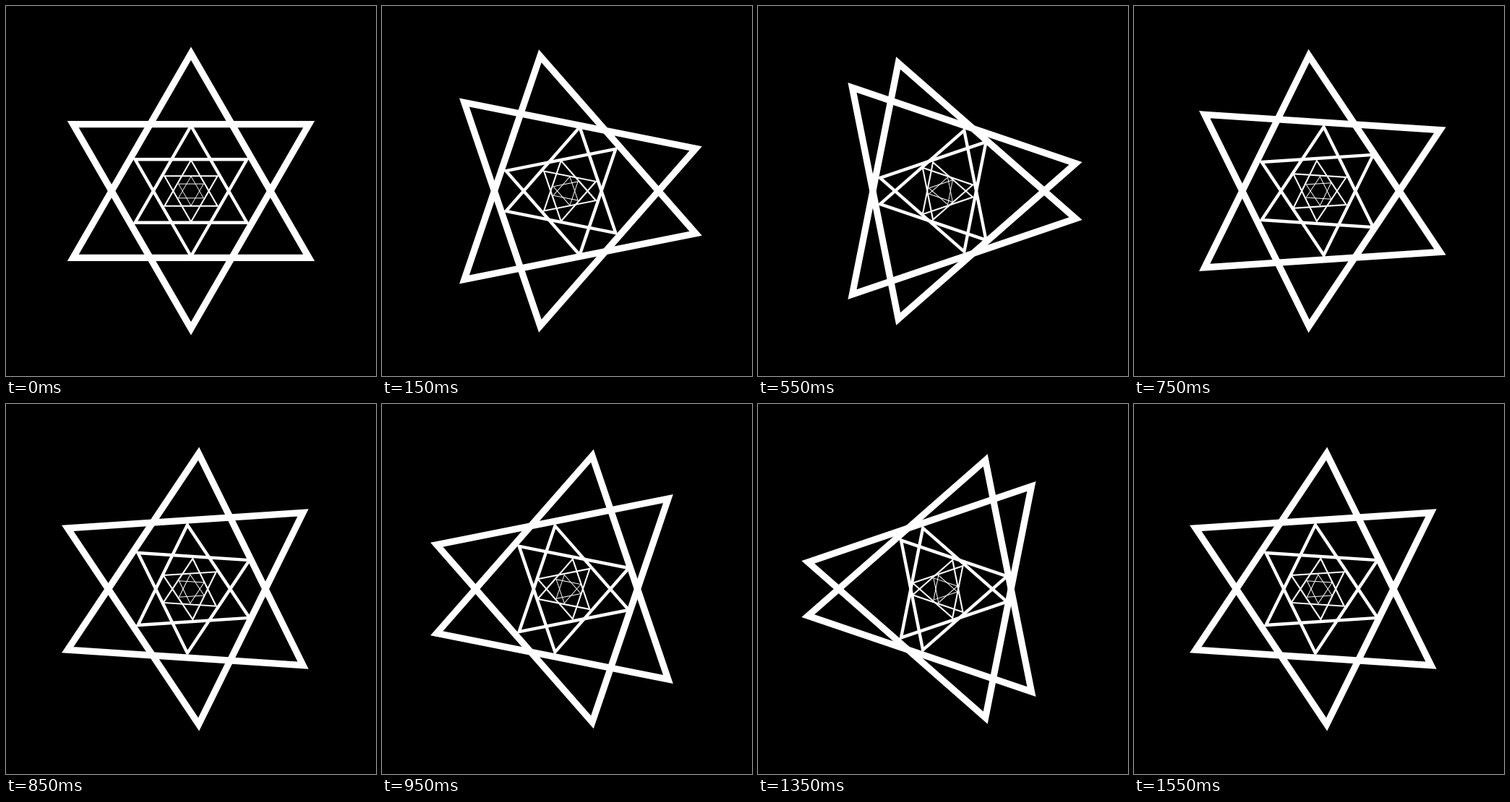
An HTML page with a canvas that plays this animation: 512x512 px, repeating every 1600 ms.

```html
<!DOCTYPE html>
<html lang="en">
<head>
<meta charset="utf-8">
<title>Nested turning triangles</title>
<style>
  html, body { margin: 0; width: 100%; height: 100%; overflow: hidden; background: #000; }
  canvas { display: block; width: 512px; height: 512px; }
</style>
</head>
<body>
<canvas id="stage" width="512" height="512"></canvas>
<script>
const ctx = document.getElementById('stage').getContext('2d');
const LOOP = 1600, STEP = 50, CENTER = 256;
const RADIUS = 197.7, WIDTH = 9.2;
const SHIFT = 1.9;    // centroid offset from the pivot, towards the first corner
const LEVELS = 4, RATIO = -0.474; // each level is a smaller, inverted copy

function triangle() {
  const r = RADIUS - WIDTH; // the mitred corner reaches one line width further out
  ctx.beginPath();
  for (let i = 0; i < 3; i++) {
    const a = i * Math.PI * 2 / 3;
    ctx.lineTo(SHIFT + r * Math.cos(a), r * Math.sin(a));
  }
  ctx.closePath();
  ctx.stroke();
}

function nest(angle) {
  ctx.save();
  ctx.translate(CENTER, CENTER);
  ctx.rotate(angle);
  for (let i = 0; i < LEVELS; i++) {
    triangle();
    ctx.scale(RATIO, RATIO);
  }
  ctx.restore();
}

function draw(time) {
  const step = Math.floor((time % LOOP) / STEP);
  const turn = Math.PI / 2 + step * STEP / LOOP * Math.PI * 2 / 3;
  ctx.fillStyle = '#000';
  ctx.fillRect(0, 0, 512, 512);
  ctx.strokeStyle = '#fff';
  ctx.lineWidth = WIDTH;
  ctx.lineJoin = 'miter';
  nest(turn);
  nest(-turn);
}

const start = performance.now();
function tick() {
  draw(performance.now() - start);
  requestAnimationFrame(tick);
}
tick();
</script>
</body>
</html>
```
